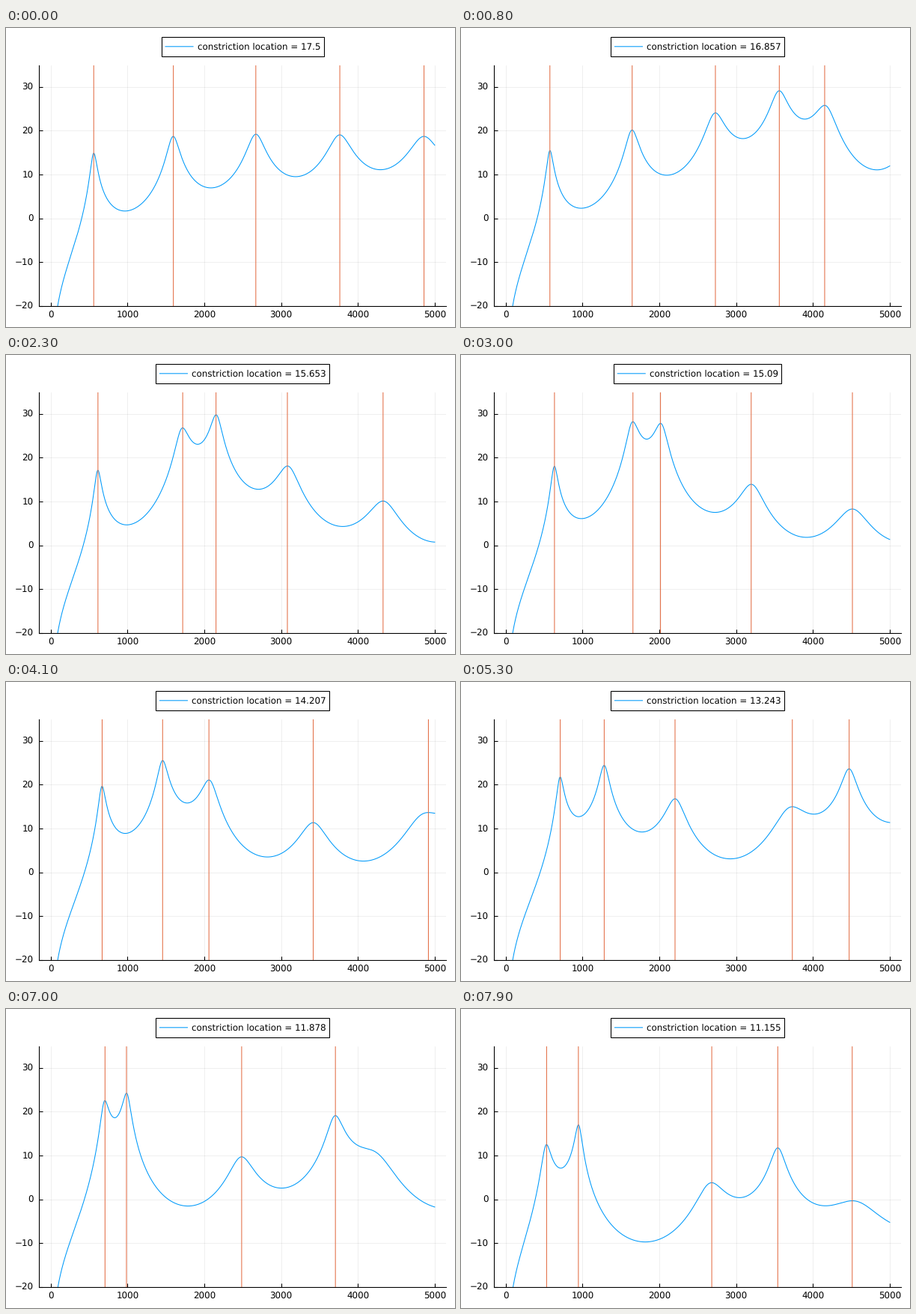
These frames come from a looping animation (600x400 px, 8 s). A matplotlib script:

```python
import numpy as np
import matplotlib.pyplot as plt
from matplotlib.animation import FuncAnimation
from matplotlib.patches import Rectangle

W, H, PX = 600, 400, 0.72          # stage size, points per pixel
FRAMES, INTERVAL = 80, 100
STEP = 20 / 249                    # constriction shift per frame, cm
BLUE, ORANGE = "#009AFA", "#E36F47"
FONT = 11.85 * PX
LEFT, RIGHT, TOP, BOTTOM = 44.3, 588.3, 49.6, 371.6

plt.rcParams["font.family"] = "DejaVu Sans"
plt.rcParams["text.hinting"] = "none"

freq = np.linspace(20, 5000, 2000)


def resonances(t):
    """Six lowest formants and bandwidths (Hz) of the two coupled cavities."""
    k = np.arange(6)
    back = max(STEP * t, 1e-3)                 # back cavity length, cm
    squeeze = np.clip((t - 62) / 17, 0, 1)     # constriction narrows at the end

    # Front cavity: odd quarter waves of a shortening tube
    shrink = 1 / (1 - (0.0055 - 0.0008 * 0.6**k) * t)
    front = (560 + 1100 * k - 100 * (1 - 0.35**k)) * shrink
    front_width = 78 + 64 * k * shrink**2.7

    # Back cavity: Helmholtz mode and half wave
    helmholtz = (3275 - 6 * t) / np.sqrt(back) * (1 - 0.366 * squeeze)
    half_wave = 23435 / (back + 1) * (1 + 0.117 * squeeze)

    m = np.diag(np.append(front, [helmholtz, half_wave])
                + 0.5j * np.append(front_width, [95, 165]))
    m[6, :6] = m[:6, 6] = 150 * 1.32**k
    m[7, 2] = m[2, 7] = 135
    m[7, 3] = m[3, 7] = 80
    modes = np.linalg.eigvals(m)
    modes = modes[np.argsort(modes.real)][:6]
    return modes.real, 2 * modes.imag


def spectrum(t):
    """Radiated level in dB: a product of poles, evenly spaced above the sixth."""
    poles, widths = resonances(t)
    x = freq[:, None] / poles
    near = np.abs(1 - x**2 + 1j * x * widths / poles).prod(axis=1)
    upper = (1091 - 0.5 * t) * (np.arange(7, 300) - 0.5)
    far = (1 - (freq[:, None] / upper) ** 2).prod(axis=1)
    loss = 0.6 * np.clip((t - 62) / 17, 0, 1)
    return 20 * np.log10(freq / 1000 / (near * far)) + 0.5 - loss


def peaks(y):
    mid = y[1:-1]
    return freq[1:-1][(mid > y[:-2]) & (mid > y[2:])]


fig = plt.figure(figsize=(W / 100, H / 100), dpi=100, facecolor="white")
page = fig.add_axes([0, 0, 1, 1])
page.set(xlim=(0, W), ylim=(H, 0))
page.axis("off")

ax = fig.add_axes([LEFT / W, 1 - BOTTOM / H, (RIGHT - LEFT) / W, (BOTTOM - TOP) / H])
ax.set(xlim=(-150, 5150), ylim=(-20, 35))
ax.set_xticks(range(0, 5001, 1000))
ax.set_yticks(range(-20, 31, 10))
ax.set_axisbelow(True)
ax.patch.set_visible(False)
ax.grid(color="black", alpha=0.1, lw=0.6 * PX)
ax.spines[["top", "right"]].set_visible(False)
for side in ("left", "bottom"):
    ax.spines[side].set_linewidth(1.1 * PX)
ax.tick_params(direction="in", length=5 * PX, width=1.1 * PX,
               labelbottom=False, labelleft=False)

for v in range(0, 5001, 1000):
    x = LEFT + (v + 150) / 5300 * (RIGHT - LEFT)
    page.text(x, 387.5, str(v), ha="center", va="baseline", fontsize=FONT)
for v in range(-20, 31, 10):
    y = BOTTOM - (v + 20) / 55 * (BOTTOM - TOP)
    page.text(36.5, y + 4.4, str(v).replace("-", "\u2212"), ha="right",
              va="baseline", fontsize=FONT)

curve, = ax.plot([], [], color=BLUE, lw=1.05 * PX, zorder=3)
marks, = ax.plot([], [], color=ORANGE, lw=1.05 * PX, zorder=4, snap=False)

frame = Rectangle((0, 11.5), 1, 26.5, fc="white", ec="black", lw=1.1 * PX)
page.add_patch(frame)
sample, = page.plot([], [], color=BLUE, lw=1.05 * PX, snap=False)
label = page.text(337.8, 29.2, "", ha="center", va="baseline", fontsize=FONT)


def update(t):
    y = spectrum(t)
    curve.set_data(freq, y)
    tops = peaks(y)
    marks.set_data(np.repeat(tops, 3), np.tile([-20, 35, np.nan], len(tops)))

    label.set_text(f"constriction location = {round(17.5 - STEP * t, 3):g}")
    box = label.get_window_extent()
    frame.set_x(box.x0 - 48)
    frame.set_width(box.width + 52.5)
    sample.set_data([box.x0 - 42.5, box.x0 - 5.5], [24.8, 24.8])
    return [curve, marks, frame, sample, label]


anim = FuncAnimation(fig, update, frames=FRAMES, interval=INTERVAL,
                     init_func=lambda: update(0), repeat=True, repeat_delay=0)
plt.show()
```
